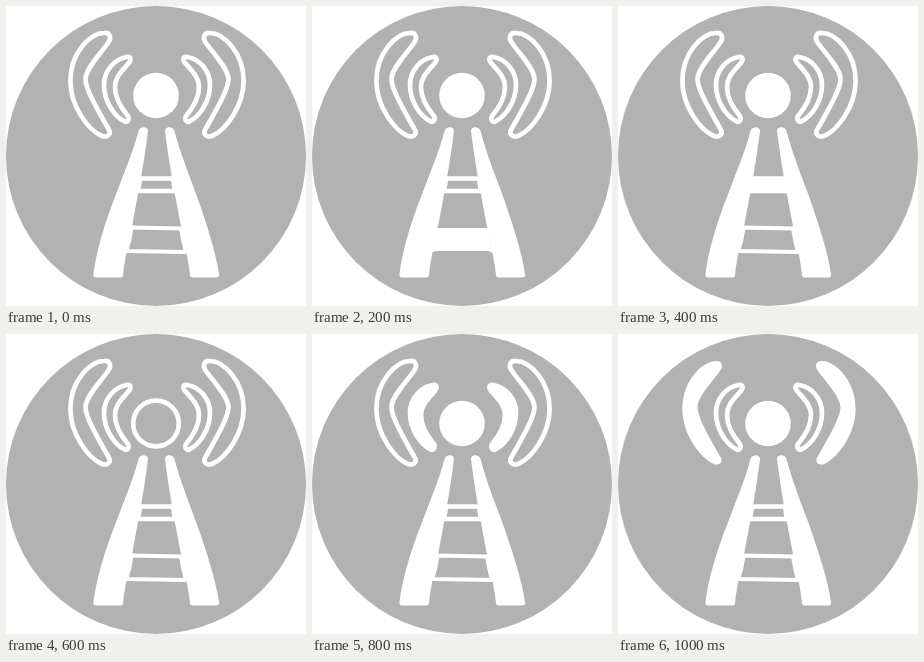
An HTML page with a canvas for the animation above (1200 ms loop, 300x300 px).

```html
<!DOCTYPE html>
<html lang="en">
<head>
<meta charset="utf-8">
<title>Radio mast</title>
<style>
html, body { margin: 0; width: 100%; height: 100%; overflow: hidden; background: #fff; }
canvas { display: block; width: 100vw; height: 100vh; }
</style>
</head>
<body>
<canvas id="stage" width="300" height="300"></canvas>
<script>
const ctx = document.getElementById('stage').getContext('2d');
const STEP = 200, STEPS = 6;
const GREY = '#b2b2b2', WHITE = '#fff';

const bigWave = new Path2D('M98 27C85 27 64.400 46 64.400 75C64.400 100 82 124 96 130C101 132 106 128 102.500 123C93 106 79.500 84 79.500 73C80 62 95 47 102 37C106 32 104 26.500 98 27Z');
const smallWave = new Path2D('M121 51C108 53 98 65 98 79C98 95 108 110 118 115C121 117 124 114 122 110C116 103 109 93 109 81C109 71 116 65 122 58C126 54 125 50.500 121 51Z');
const leftLeg = new Path2D('M132.500 125C134 120 142 120 142 125C139 150 134 178 128 210C124 231 119 250 117 269Q117 271.500 114 271.500H90Q87 271.500 87.500 268C90 246 99 216 109 191C118 167 127 146 132.500 125Z');
const rightLeg = new Path2D('M159 125C159 120 167 120 168.500 125C174 146 182 166 190.500 189C200 216 210 246 213 268Q213.500 271.500 210 271.500H187Q184 271.500 184 269C182 250 177 231 173 210C167 178 162 150 159 125Z');
const upperRung = new Path2D('M134 172.500H167L169 185H132Z');
const lowerRung = new Path2D('M125.500 221.500L175 222.500Q177 234 180 246L120 245Q124 233 125.500 221.500Z');
const lowerSolid = new Path2D('M124 222H176Q178 234 181 248Q179 245 175 245H125Q121 245 119 248Q123 234 124 222Z');
const ball = new Path2D();
ball.arc(150, 89.5, 22.8, 0, Math.PI * 2);

function outline(path, width = 4.7) {
  ctx.lineWidth = width;
  ctx.stroke(path);
}

function toggle(path, solid) {
  if (solid) ctx.fill(path);
  else outline(path);
}

function waves(step) {
  toggle(bigWave, step === 5);
  if (step === 4) ctx.fill(smallWave);
  outline(smallWave);
}

function draw(step) {
  ctx.fillStyle = WHITE;
  ctx.fillRect(0, 0, 300, 300);
  ctx.fillStyle = GREY;
  ctx.beginPath();
  ctx.arc(150, 150, 150, 0, Math.PI * 2);
  ctx.fill();

  ctx.fillStyle = ctx.strokeStyle = WHITE;
  ctx.lineJoin = 'round';

  if (step === 1) ctx.fill(lowerSolid);
  else outline(lowerRung, 4.2);
  if (step === 2) ctx.fill(upperRung);
  outline(upperRung);
  ctx.fill(leftLeg);
  ctx.fill(rightLeg);
  toggle(ball, step !== 3);

  waves(step);
  ctx.save();
  ctx.translate(302, 0);
  ctx.scale(-1, 1);
  waves(step);
  ctx.restore();
}

const start = performance.now();
function tick() {
  const t = performance.now() - start;
  draw(Math.floor(t / STEP) % STEPS);
  requestAnimationFrame(tick);
}
tick();
</script>
</body>
</html>
```
